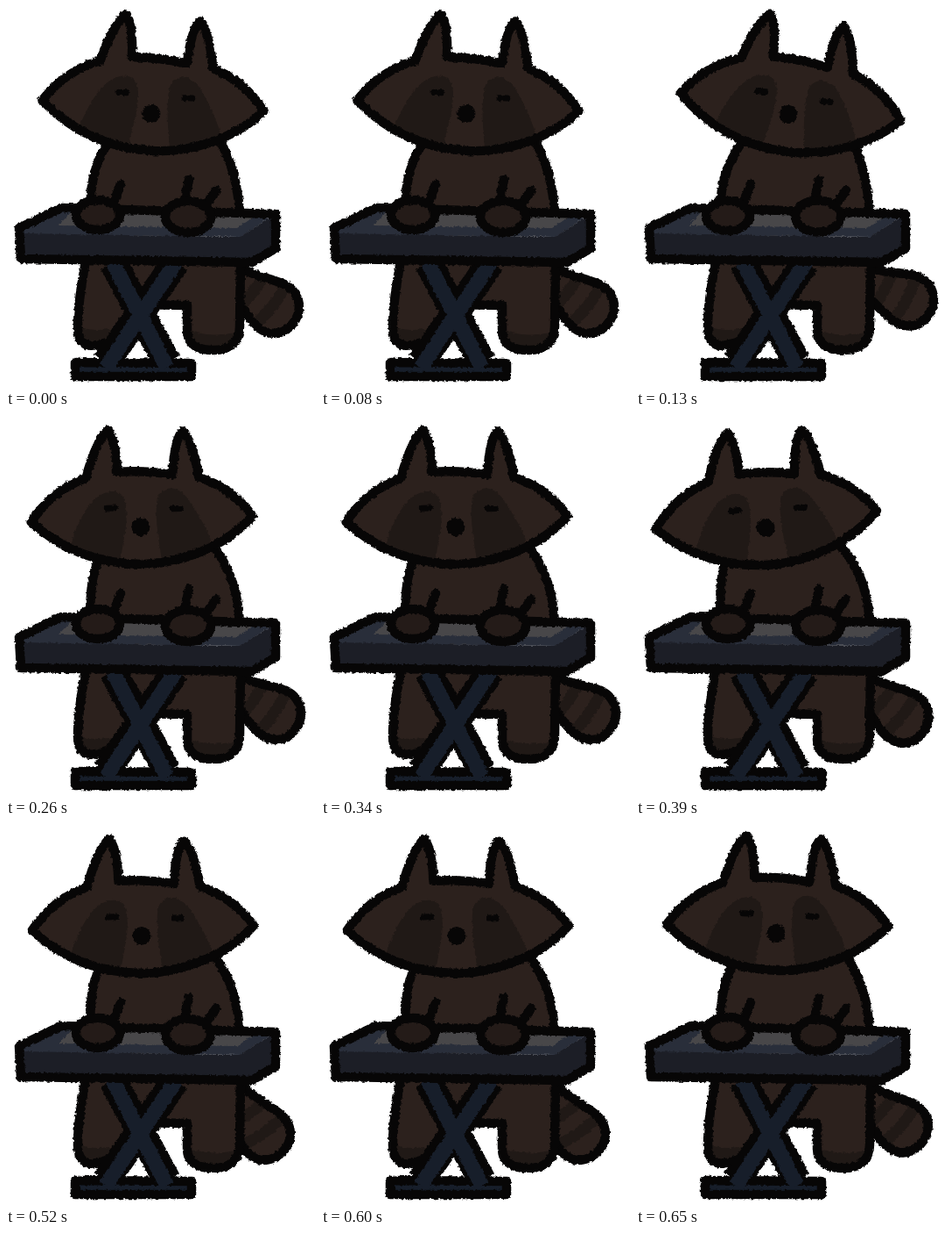
Recreate the animation shown at these times as an HTML page. Size 353 by 434 pixels, loop 780 ms.

```html
<!DOCTYPE html>
<html lang="en">
<head>
<meta charset="utf-8">
<title>Raccoon at the keyboard</title>
<style>
  html, body { margin: 0; width: 100%; height: 100%; overflow: hidden; background: #fff; }
  svg { display: block; width: 100vw; height: 100vh; }
  .ink { stroke: #070606; stroke-width: 10.5; stroke-linejoin: round; stroke-linecap: round; }
  .fur { fill: #2c211d; }
  .dark { fill: #201916; }
  .line { fill: none; }
</style>
</head>
<body>
<svg viewBox="0 0 353 434">
  <defs>
    <filter id="rough" filterUnits="userSpaceOnUse" x="0" y="0" width="353" height="434" color-interpolation-filters="sRGB">
      <feTurbulence id="noise" type="fractalNoise" baseFrequency=".3" numOctaves="2"/>
      <feDisplacementMap in="SourceGraphic" scale="4" xChannelSelector="R" yChannelSelector="G"/>
    </filter>
    <path id="skull" d="M-125-9 C-108-33-88-48-61-57 C-54-80-45-102-34-111 C-28-102-25-84-25-63 Q8-64 38-58 C40-80 44-101 51-107 C60-98 65-75 68-54 C94-45 113-30 128-8 C96 26 45 43 3 43 C-49 42-91 24-125-9Z"/>
    <clipPath id="face"><use href="#skull"/></clipPath>
    <path id="brush" d="M-4-13 C14-16 30-26 46-30 C67-33 81-18 80 1 C79 21 63 30 44 27 C28 23 13 18-4 13Z"/>
    <clipPath id="bush"><use href="#brush"/></clipPath>
    <path id="legs" d="M92 286 C86 316 82 345 82 366 C82 383 91 389 103 386 L120 382 L150 340 L207 341 L207 370 C207 386 220 392 237 392 C257 392 267 381 267 365 L268 286Z"/>
    <clipPath id="feet"><use href="#legs"/></clipPath>
  </defs>
  <g filter="url(#rough)">
    <g id="tail">
      <use href="#brush" class="fur"/>
      <g clip-path="url(#bush)" fill="none" stroke="#201916" stroke-width="13">
        <path d="M17-40 Q27 0 17 40M44-40 Q55 0 44 40"/>
      </g>
      <use href="#brush" class="ink line"/>
    </g>

    <use href="#legs" class="fur"/>
    <path class="dark" clip-path="url(#feet)" d="M70 360 Q95 374 130 366 V400 H70Z M200 366 Q235 382 275 368 V400 H200Z"/>
    <use href="#legs" class="ink line"/>
    <path id="torso" class="fur ink"/>

    <g fill="none">
      <path stroke="#070606" stroke-width="32" d="M122 292 L184 406M194 292 L114 406"/>
      <path class="ink" fill="#171e2a" d="M79 406 L212 407 L212 422 L79 422Z"/>
      <path stroke="#171e2a" stroke-width="17" d="M122 292 L184 412M194 292 L114 412"/>
    </g>

    <path fill="#292e3a" d="M15 253 L63 230 L308 237 L268 263 L15 260Z"/>
    <path fill="#484749" d="M60 250 L78 231 L288 237 L264 253Z"/>
    <path fill="#1c1e26" d="M15 259 L267 263 L308 237 L308 276 L281 292 L16 289Z"/>
    <path class="ink line" d="M15 253 L63 230 L308 237 L308 276 L281 292 L17 288Z"/>

    <path class="ink line" d="M131 203 L124 221M209 198 L204 222M240 210 L230 224"/>
    <g class="ink" fill="#241b18">
      <ellipse id="left" rx="25" ry="17"/>
      <ellipse id="right" rx="26" ry="18"/>
    </g>

    <g id="head">
      <use href="#skull" class="fur"/>
      <path class="dark" clip-path="url(#face)" d="M-84 26 C-72-8-56-41-31-41 C-16-41-14-24-17 0 L-26 45 L-84 45Z M24 45 C18 10 15-30 23-37 C34-48 49-41 58-25 C71-4 79 12 84 35 L75 45Z"/>
      <use href="#skull" class="ink line"/>
      <path class="ink line" style="stroke-width:7" d="M-38-22 L-29-22M37-19 L46-19"/>
      <circle r="10.5" cy=".5" fill="#070606"/>
    </g>
  </g>
</svg>
<script>
const STEP = 130;
// head x, head y, head tilt, tail angle, hand lift
const poses = [
  [166, 122, 2.6, 39, 0],
  [174, 123, 6.8, 28, 1],
  [154, 127, -1.8, 35, 0],
  [148, 128, -5, 40, 0],
  [155, 127, -1.5, 55, 0],
  [160, 124, 0.2, 41, -1]
];
const el = id => document.getElementById(id);
const set = (id, name, value) => el(id).setAttribute(name, value);
let shown = -1;

function draw(i) {
  const [x, y, tilt, wag, lift] = poses[i];
  const lean = (x - 160) * 0.5;
  set("head", "transform", `translate(${x} ${y}) rotate(${tilt})`);
  set("tail", "transform", `translate(265 312) rotate(${wag})`);
  set("torso", "d", `M${116 + lean} 152 C${102 + lean} 172 96 195 96 236 L267 236 C265 208 260 178 ${236 + lean} 144`);
  set("left", "transform", `translate(105 ${238 + lift})`);
  set("right", "transform", `translate(208 ${240 - lift / 2})`);
  set("noise", "seed", i + 1);
}

function tick() {
  const i = Math.floor(performance.now() / STEP) % poses.length;
  if (i !== shown) draw(shown = i);
  requestAnimationFrame(tick);
}
tick();
</script>
</body>
</html>
```
